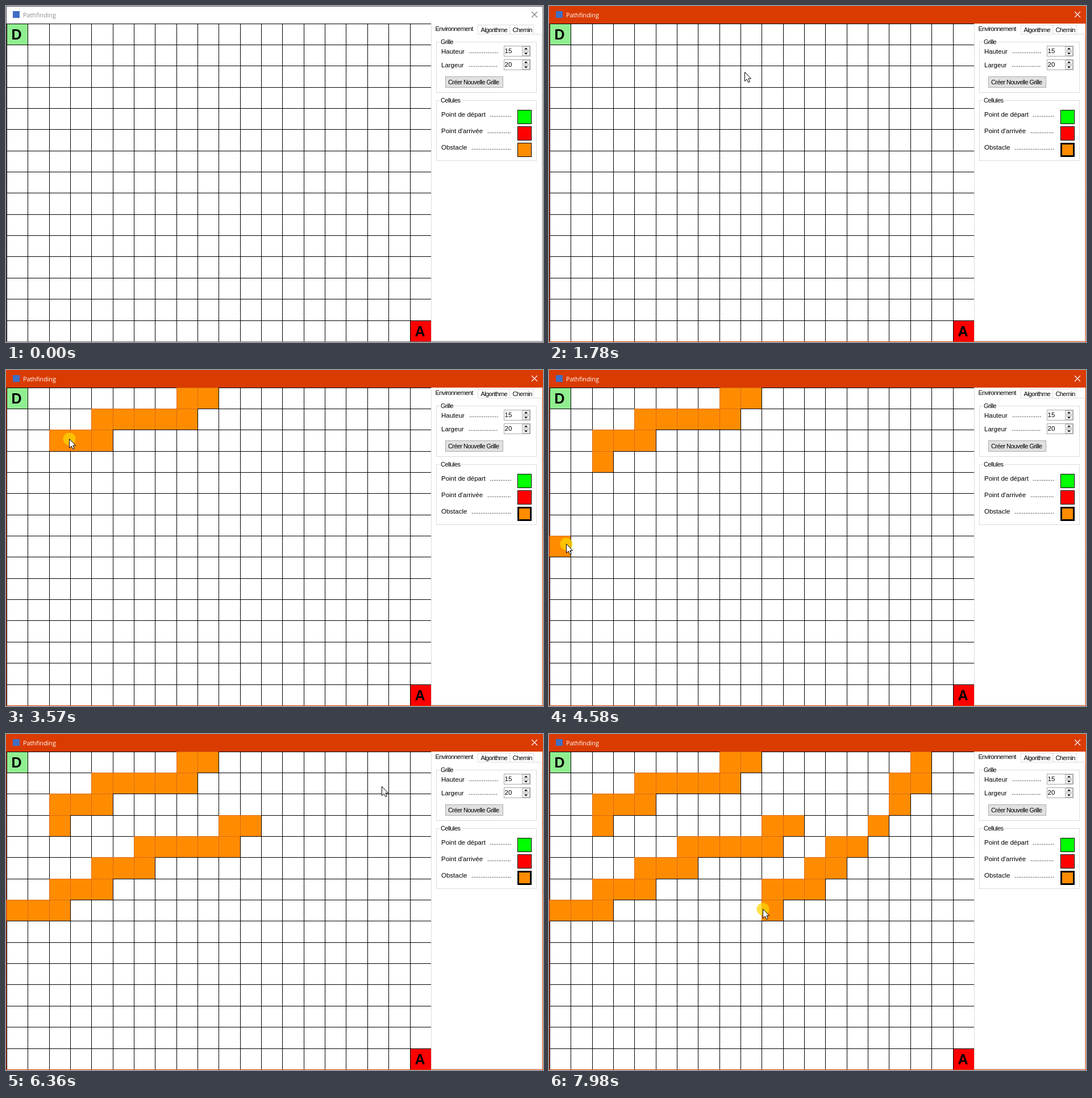
These frames come from a looping animation (945 by 592 pixels, 8 s). An HTML page with a canvas:

```html
<!DOCTYPE html>
<html lang="fr">
<head>
<meta charset="utf-8">
<title>Pathfinding</title>
<style>
html, body { margin: 0; width: 100%; height: 100%; overflow: hidden; background: #fff; }
canvas { display: block; }
</style>
</head>
<body>
<canvas id="stage" width="945" height="592"></canvas>
<script>
const LOOP = 8000, STEP = 850 / 11, PHASE = 19;
const COLS = 20, ROWS = 15, SIZE = 37.343, LEFT = 1, TOP = 30.7;
const ACTIVE_AT = 1250;
const ctx = document.getElementById('stage').getContext('2d');
const SANS = '"Liberation Sans", Arial, sans-serif';

// Pointer strokes; the pointer rests between them
const strokes = [];
function stroke(from, to, d, down = false, power = 1) {
  const path = document.createElementNS('http://www.w3.org/2000/svg', 'path');
  path.setAttribute('d', d);
  strokes.push({ from, to, down, power, path, length: path.getTotalLength() });
}
const move = stroke;
const drag = (from, to, d, power) => stroke(from, to, d, true, power);

move(150, 840, 'M926 554Q846 210 914 257');
drag(1250, 1400, 'M914 257h.1');
move(1400, 1715, 'M914 257L344 117');
move(1715, 2020, 'M344 117L370 52');
drag(2260, 2875, 'M373 50L294 72');
drag(2875, 3880, 'M294 72L230 91 163 98 156 110 95 125 84 147 88 158', 1.6);
move(3960, 4490, 'M88 158L26 304');
drag(4490, 4570, 'M26 304L27 307');
drag(4570, 5500, 'M27 307L83 294 160 262 178 245 235 226 250 208 365 184');
drag(5500, 5820, 'M365 184L385 181 394 172 430 160');
move(5860, 6350, 'M430 160L661 93');
move(6350, 6660, 'M661 93V78L664 50');
drag(6740, 7040, 'M664 50v1');
drag(7040, 7975, 'M664 51L652 80 622 95 609.217 132 549.217 192 510 205 495 230 470 242 458 262 423 281 376 308');

function pointer(t) {
  const s = strokes.filter(s => s.from <= t).pop();
  if (!s) return null;
  const u = Math.min(1, (t - s.from) / (s.to - s.from));
  const { x, y } = s.path.getPointAtLength(s.length * (1 - (1 - u) ** s.power));
  const last = s === strokes[strokes.length - 1];
  return { x, y, down: s.down && (t < s.to || last) };
}

// Time at which the pressed pointer first enters each cell
const walls = new Map();
for (let t = 0; t < LOOP; t += 5) {
  const p = pointer(t);
  if (!p || !p.down) continue;
  const c = Math.floor((p.x - LEFT) / SIZE), r = Math.floor((p.y - TOP) / SIZE);
  const id = r * COLS + c;
  if (c < COLS && !walls.has(id)) walls.set(id, t);
}

const colX = c => Math.round(LEFT + SIZE * c);
const rowY = r => Math.round(TOP + SIZE * r);

function rect(x, y, w, h, color) {
  ctx.fillStyle = color;
  ctx.fillRect(x, y, w, h);
}

function box(x, y, w, h, fill, line, width = 1) {
  rect(x, y, w, h, line);
  rect(x + width, y + width, w - 2 * width, h - 2 * width, fill);
}

function text(s, x, y, font, color = '#000', spacing = 0, align = 'left') {
  ctx.font = font;
  ctx.fillStyle = color;
  ctx.letterSpacing = spacing + 'px';
  ctx.textAlign = align;
  ctx.fillText(s, x, y);
}

const label = (s, x, y) => text(s, x, y, '11.5px ' + SANS);
const tight = (s, x, y) => text(s, x, y, '11px ' + SANS, '#000', -0.6);

function line(d, color, width = 1) {
  ctx.strokeStyle = color;
  ctx.lineWidth = width;
  ctx.stroke(new Path2D(d));
}

function fill(d, color) {
  ctx.fillStyle = color;
  ctx.fill(new Path2D(d));
}

function drawFrame(active) {
  const edge = active ? '#da3b01' : '#5a4a55';
  rect(0, 0, 945, 592, '#fff');
  if (active) rect(0, 0, 945, 31, edge);
  rect(0, 0, 945, 1, edge);
  rect(0, 0, 1, 592, edge);
  rect(944, 0, 1, 592, active ? edge : '#8a8a8a');
  rect(0, 591, 945, 1, active ? edge : '#6e6e6e');
  rect(12, 9, 12, 12, '#3f6fc4');
  text('Pathfinding', 30, 20, '10.8px "Open Sans", sans-serif', active ? '#fff' : '#8c8c8c');
  line('M925 10l10 10M935 10l-10 10', active ? '#fff' : '#808080', 1.2);
}

function endpoint(c, r, color, letter) {
  const x = colX(c), y = rowY(r);
  rect(x, y, colX(c + 1) - x, rowY(r + 1) - y, color);
  text(letter, x + 17.5, y + 27.5, 'bold 25px ' + SANS, '#000', 0, 'center');
}

function drawGrid(t) {
  endpoint(0, 0, '#90ee90', 'D');
  endpoint(COLS - 1, ROWS - 1, '#f00', 'A');
  for (let c = 0; c < COLS; c++) rect(colX(c), 31, 1, 560, '#000');
  for (let r = 0; r < ROWS; r++) rect(LEFT, rowY(r), 747, 1, '#000');
  for (const [id, since] of walls) {
    if (since > t) continue;
    const c = id % COLS, r = Math.floor(id / COLS);
    const x = colX(c), y = rowY(r), w = colX(c + 1) - x, h = rowY(r + 1) - y;
    rect(x, y, w, h, '#da6a14');
    rect(x + 1, y + 1, w - 1, h - 1, '#ff8c00');
  }
}

function group(title, y, h, gap) {
  box(757, y, 177, h, '#fff', '#dcdcdc');
  rect(763, y, gap, 1, '#fff');
  tight(title, 765, y + 4);
}

function spinner(name, value, y, dotsX) {
  label(name, 766, y + 14);
  label('.'.repeat(16), dotsX, y + 13);
  box(876, y, 47, 19, '#fff', '#a8a8a8');
  label(value, 877.5, y + 12.5);
  for (const [dy, tip] of [[1, -1], [10, 1]]) {
    box(908, y + dy, 14, 8, '#f0f0f0', '#b4b4b4');
    fill(`M912 ${y + dy + 4 - tip * 1.5}h6l-3 ${tip * 3}z`, '#000');
  }
}

function swatch(name, y, color, dotsX, dots, selected) {
  label(name, 766, y + 12);
  label('.'.repeat(dots), dotsX, y + 12);
  box(900, y, 25, 25, color, '#000', selected ? 3 : 1);
}

function drawPanel(selected) {
  line('M748.5 31V589.5H942.5V49.5H830.5V31M831 33.5H928.5V49M886.5 33V49', '#dcdcdc');
  tight('Environnement', 755.5, 44);
  tight('Algorithme', 835.5, 46);
  tight('Chemin', 891.5, 46);

  group('Grille', 63, 90, 27);
  spinner('Hauteur', '15', 70, 815);
  spinner('Largeur', '20', 94, 814);
  box(773, 124, 102, 20, '#e1e1e1', '#adadad');
  tight('Créer Nouvelle Grille', 778, 138);

  group('Cellules', 166, 107, 39);
  swatch('Point de départ', 183, '#0f0', 851, 12, false);
  swatch("Point d'arrivée", 212, '#f00', 847, 13, false);
  swatch('Obstacle', 241, '#ff8c00', 819, 22, selected);
}

function drawPointer({ x, y, down }) {
  ctx.save();
  ctx.translate(Math.round(x) + 0.5, Math.round(y) + 0.5);
  if (down) fill('M-11 0a11 11 0 0 1 22 0a11 11 0 0 1-22 0', 'rgba(255, 215, 0, 0.72)');
  const arrow = 'M0 0V16L3.7 12.6 6.2 18 8.8 17 6.4 11.5H11Z';
  fill(arrow, '#fff');
  line(arrow, '#000');
  ctx.restore();
}

const start = performance.now();
function draw() {
  const now = (performance.now() - start) % LOOP;
  // The picture advances in even steps
  const t = Math.floor((now - PHASE) / STEP) * STEP + PHASE;
  const active = t >= ACTIVE_AT, p = pointer(t);
  drawFrame(active);
  drawGrid(t);
  drawPanel(active);
  if (p) drawPointer(p);
  requestAnimationFrame(draw);
}
draw();
</script>
</body>
</html>
```
